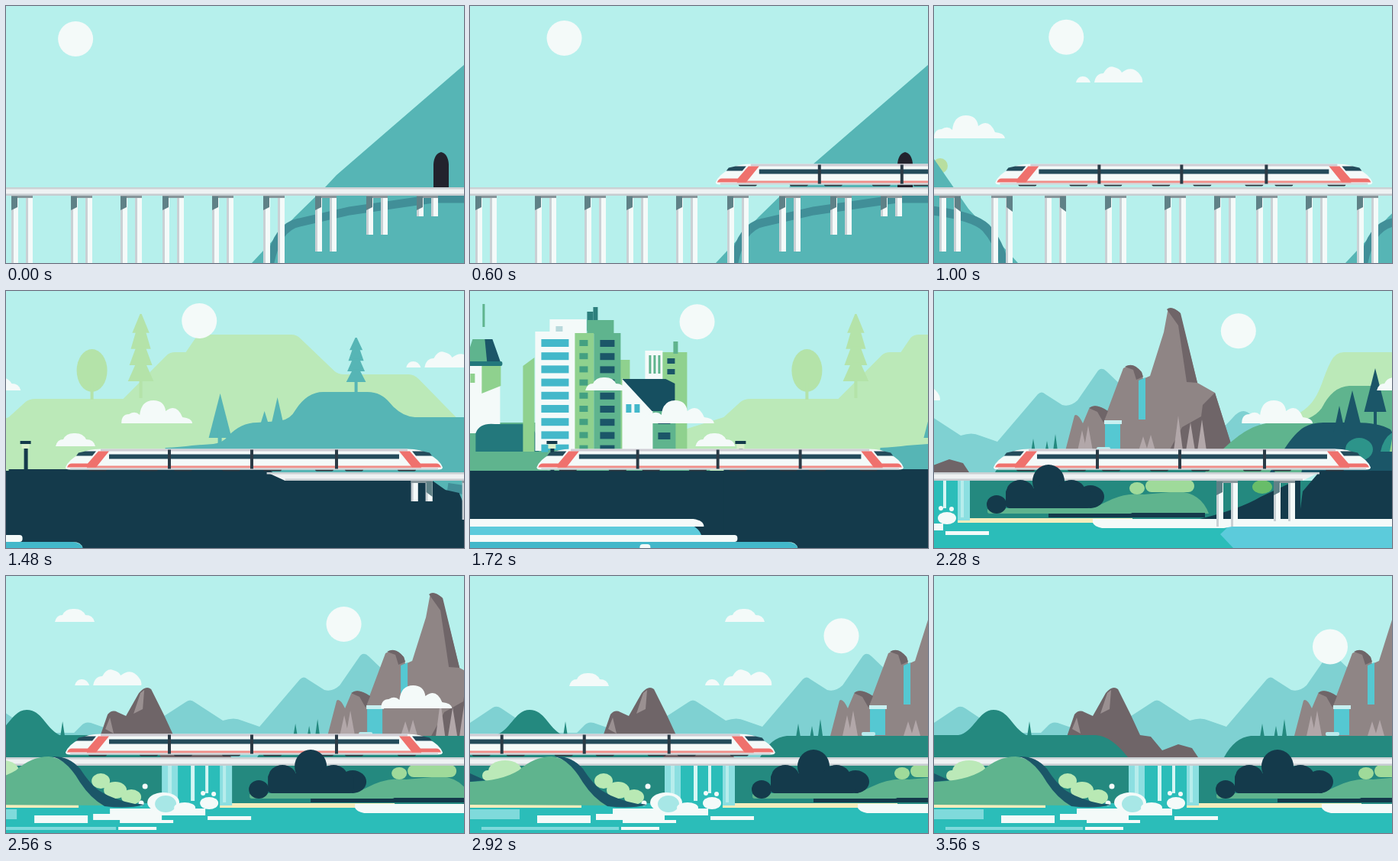
These frames come from a looping animation (600x336 px, 3600 ms). An HTML page:

```html
<!DOCTYPE html>
<html lang="en">
<head>
<meta charset="utf-8">
<title>Train journey</title>
<style>
html, body { margin: 0; width: 100%; height: 100%; overflow: hidden; background: #b6f0ec; }
svg { display: block; width: 100vw; height: 100vh; }
</style>
</head>
<body>
<svg id="stage" viewBox="0 0 600 336" preserveAspectRatio="none"></svg>
<script>
const sky = '#b6f0ec', white = '#f4faf9', navy = '#143a4b', teal = '#56b5b5', pale = '#bbe9b8',
  green = '#5fb48e', deep = '#24897f', ink = '#1b5668', rock = '#8f8585', shade = '#6f6568',
  far = '#7fd1d2', sea = '#2bbdb9', blue = '#5ccbdb', cyan = '#43b8ca', red = '#ef716d',
  sand = '#f5edbc', leaf = '#8fd18e', bush = '#2d948a';

const path = (fill, d) => `<path fill="${fill}" d="${d}"/>`;
const rect = (fill, x, y, w, h, r = 0) => `<rect fill="${fill}" x="${x}" y="${y}" width="${w}" height="${h}" rx="${r}"/>`;
const oval = (fill, x, y, rx, ry = rx) => `<ellipse fill="${fill}" cx="${x}" cy="${y}" rx="${rx}" ry="${ry}"/>`;
const at = (x, ...parts) => `<g transform="translate(${x})">${parts.join('')}</g>`;
const many = (n, f) => Array.from({ length: n }, (_, i) => f(i)).join('');
const cone = (fill, x, y, w, h) => path(fill, `M${x} ${y}l${w / 2} ${h}h${-w}z`);

// Pine made of stacked tiers on a thin trunk
const pine = (fill, x, y, w, h, trunk) => many(4, i => {
  const half = w * (0.33 + i * 0.055), tip = i ? w * 0.17 : 1, top = y + h * i * 0.24;
  return path(fill, `M${x - tip} ${top}H${x + tip}L${x + half} ${top + h * 0.28}H${x - half}z`);
}) + rect(fill, x - 2, y + h - 2, 4, trunk);

const lamp = x => rect(navy, x - 7, 196, 14, 4) + rect('#d9efcb', x - 5, 200, 10, 6) + rect(navy, x - 2, 206, 5, 30);

// Twin columns; flip puts the cap shadow on the right one
function pier(x, end = 336, flip = false) {
  const column = cx => rect('#c9d0d4', cx, 248, 9, end - 248) + rect(white, cx + 3, 248, 6, end - 248);
  return column(x - 3) + column(x + 16) + rect('#87969b', x - 3, 247, 28, 4) +
    path('#5f8187', flip ? `M${x + 25} 249v20l-8-6v-14z` : `M${x - 3} 249v18l8-4v-14z`);
}

// Deck with top edge x0..x1 and bottom edge x2..x3
const bridge = (x0, x1, x2, x3) => path('#eff2f3', `M${x0} 237H${x1}L${x3} 248H${x2}z`) +
  rect('#cbd1d4', x0, 237, x1 - x0, 2.5) + rect('#c6ccd0', x2, 245.5, x3 - x2, 2.5);

const farRange = path(far, 'M0 192L30 172Q35 169 41 173L62 187L85 205H140L150 195Q155 190 162 192L185 200L238 196L286 165Q292 160 298 165L335 189Q350 184 360 189L383 197L436 135Q441 130 446 135L468 149Q478 152 488 143L515 104Q520 99 526 105L548 126L640 220L692 165Q705 150 716 163L760 205V237H0z');

const lake = [
  farRange,
  path(shade, 'M174 210L184 181Q190 174 197 178L208 183L225 153Q234 142 241 148L258 182L270 208L284 210L299 228L320 220L338 225L346 237H230z'),
  path('#9a9091', 'M218 180L227 153L232 149L230 174zM181 200L187 185L192 206z'),
  path(deep, 'M0 208H32C52 205 58 175 78 175S102 198 121 208H212Q232 209 254 237H0z'),
  path(deep, 'M380 237Q394 211 415 209H720L800 237z'),
  cone(deep, 125, 190, 6, 20), cone(deep, 430, 193, 6, 18), cone(deep, 459, 187, 6, 22), cone(deep, 448, 196, 5, 14),
];

const peak = [
  path(rock, 'M172 209L184 163Q188 159 195 173L203 154Q210 145 227 157L248 101Q260 93 272 106L274 115L283 111L301 54L306 27Q309 18 322 28L345 120L368 133L392 209z'),
  path(shade, 'M250 99Q261 92 272 106L274 112L265 116L261 103zM305 24Q311 18 323 29L345 120L331 119L320 45zM368 133L392 209H308L325 178L350 164L352 149zM203 153Q212 146 228 157L222 172L214 158z'),
  path('#55c8d2', 'M268 117L277 113V168H268z'), rect('#55c8d2', 224, 171, 20, 37), rect('#c8eff0', 223, 169, 23, 5),
  rect('#b8eaec', 213, 204, 18, 5, 2),
  ...[[194, 182], [202, 176], [274, 190], [284, 188], [320, 163], [336, 172], [351, 168]].map(([x, y]) => cone('#b2a7a9', x, y, 12, 209 - y)),
];

const town = [
  path(pale, 'M0 205V172Q35 168 54 147C68 130 70 110 80 92Q86 80 97 80H238Q248 80 256 86L322 148L340 205z'),
  path(green, 'M-65 210C-45 192 -30 178 -5 173H20Q55 171 68 153Q82 125 104 124H160Q174 125 180 140L200 172H430V237H-85z'),
  path(ink, 'M0 237C12 218 28 188 45 178Q57 171 75 172H112Q142 172 158 181L190 237z'),
  cone(ink, 138, 101, 29, 57), rect(ink, 136, 155, 4, 20), cone(ink, 108, 130, 24, 48), cone(ink, 91, 150, 15, 35),
  pine(bush, 209, 47, 35, 84, 45),
  path(bush, 'M145 210Q150 184 174 180Q186 162 210 164Q256 158 266 184L274 210z'),
  cone(bush, 187, 152, 14, 30), cone(bush, 240, 133, 16, 40), cone(bush, 172, 162, 12, 30),
  oval(bush, 117, 207, 18, 15), oval(green, 24, 233, 18, 15),
  cone(leaf, 164, 172, 14, 38), cone(ink, 202, 175, 16, 35),
  oval(ink, 295, 161, 17, 15), path(ink, 'M273 210V182Q276 168 295 168Q313 168 314 210z'),
  rect(white, 321, 96, 46, 90), path(leaf, 'M343 98h25v26l-25 10z'), rect(leaf, 328, 108, 6, 12),
  rect(green, 344, 17, 3, 30), path(green, 'M331 63H354L367 94H321z'), path(ink, 'M347 63H357L368 94H350z'),
  rect('#23787c', 319, 92, 51, 6, 2),
  path('#23787c', 'M335 210V186Q340 172 360 174H398Q418 178 418 210z'),
  path(leaf, 'M397 210V98L412 87V210z'), rect(leaf, 520, 90, 17, 118),
  rect(white, 432, 37, 48, 20), rect('#b9d9dc', 440, 46, 9, 7),
  rect('#2d7f7d', 481, 27, 8, 25), rect('#2d7f7d', 489, 21, 6, 22), rect(green, 481, 38, 35, 18),
  rect(white, 413, 53, 53, 156), rect(leaf, 465, 55, 25, 154), rect(green, 490, 55, 35, 154),
  many(9, i => rect(cyan, 421, 63 + i * 17.2, 36, 10) + rect('#43a081', 471, 64 + i * 17.2, 11, 8) + rect(ink, 498, 64 + i * 17.2, 19, 9)),
  rect(white, 557, 78, 23, 60), rect(leaf, 580, 80, 32, 157), rect(green, 594, 66, 6, 16),
  many(3, i => rect(green, 562 + i * 6, 84, 3, 24)), many(2, i => rect(ink, 586, 88 + i * 14, 10, 7)),
  rect(green, 563, 150, 34, 60), path(white, 'M527 209V114L567 157V209z'), path('#164f60', 'M527 115H584L596 121V157H566z'),
  many(2, i => rect(cyan, 532 + i * 11, 148, 7, 11) + rect(ink, 574, 165 + i * 20, 16, 9)),
  rect(green, 430, 208, 212, 30), lamp(223), lamp(435),
];

const hills = [
  path(pale, 'M-80 190L0 165L22 145Q27 141 35 141H150L207 84Q211 80 218 80H232L245 61Q249 57 256 57H370Q377 57 382 62L427 105Q432 109 439 109H524Q531 109 537 115L586 165L620 237H-80z'),
  oval('#b4e3a9', 109, 104, 20, 28), rect('#b4e3a9', 107, 120, 4, 22), pine('#b4e3a9', 173, 30, 34, 88, 24),
  oval('#b8dea0', 662, 209, 10),
  path(teal, 'M205 237V205Q225 204 240 202L268 200Q281 198 287 190Q304 172 325 172L355 170Q369 168 376 155Q391 132 412 132H470Q488 132 500 147Q514 164 532 165H620L654 200L699 265L764 336H560L210 237z'),
  cone(teal, 277, 134, 30, 58), rect(teal, 274, 180, 5, 23), cone(teal, 335, 157, 10, 16), cone(teal, 352, 139, 15, 33),
  pine(teal, 455, 61, 26, 58, 16), lamp(22),
  '<path d="M575 257L640 266Q705 273 722 290Q740 310 746 340" fill="none" stroke="#418f98" stroke-width="12"/>',
];

const tunnel = [
  path(teal, 'M322 336L378 276L418 237L433 221L600 77V336z'),
  path('#22232d', 'M560 238V207Q561 193 570 191Q579 193 580 207V238z'),
  '<path d="M345 340Q354 289 384 283L450 268L560 252H600" fill="none" stroke="#418f98" stroke-width="11"/>',
];

const ground = [
  // Shore and waterfall
  rect(deep, 0, 248, 805, 52), path(navy, 'M640 300Q700 286 728 269L780 245V300z'),
  rect(sea, 0, 303, 900, 33), rect(sand, 0, 297, 560, 6),
  rect('#8cdfe1', 255, 248, 92, 52), rect(sea, 276, 248, 55, 56), rect('#b7edec', 263, 248, 5, 48),
  rect('#d5f6f4', 293, 248, 5, 46), rect('#d5f6f4', 312, 248, 4, 36), rect('#b7edec', 335, 248, 4, 48), rect(sea, 146, 297, 184, 10),
  rect('#7fdadb', 0, 305, 65, 13), rect('#7fdadb', 15, 328, 180, 4),
  rect(white, 88, 313, 70, 10), rect(white, 165, 311, 90, 8), rect(white, 187, 304, 125, 9), rect(white, 200, 319, 70, 4),
  rect(white, 198, 328, 50, 4), rect(white, 315, 314, 57, 5),
  oval(white, 257, 296, 21, 13), oval('#a7e7e6', 260, 298, 14, 11), oval(white, 285, 303, 14, 7), oval(white, 317, 297, 12, 8),
  oval(white, 323, 285, 3), oval(white, 309, 284, 3), oval(white, 233, 275, 3.5), oval(white, 228, 297, 3.5),
  path(green, 'M480 291Q510 284 525 276Q550 263 575 266L620 262Q650 264 660 291z'),
  oval('#9fda9a', 566, 258, 10, 8), rect('#9fda9a', 577, 247, 64, 16, 8), oval('#68bd69', 730, 256, 13, 9),
  rect(navy, 450, 290, 205, 6), rect(green, 370, 284, 190, 7, 3),
  // Town embankment and canal
  path(navy, 'M778 300L783 262L806 235H1440V336H780z'),
  path(blue, 'M675 318L690 304H1350Q1372 308 1372 328H1400V336H692z'),
  path(white, 'M508 298H1360Q1374 300 1374 308H690L680 310H520Q510 308 508 303z'),
  path(cyan, 'M935 328H1484Q1496 330 1497 336H930z'),
  path(navy, 'M1400 233H1740L1762 248H1955L1972 260L1990 264L2005 300L2025 336H1497Q1495 328 1484 328H1400z'),
  rect(white, 1063, 319, 355, 9, 4), rect(white, 1290, 331, 14, 9, 4),
  pier(673, 308), pier(748, 301), bridge(-5, 805, -5, 783),
  pier(1930, 275, true), pier(1997, 299, true), pier(2064, 321, true), pier(2132, 336, true), pier(2202, 336, true),
  ...[10, 88, 153, 208, 273, 340].map(x => pier(2271 + x)), pier(2679, 321), pier(2746, 299), pier(2812, 275),
  bridge(1738, 2880, 1762, 2880),
];

const front = [
  oval(pale, 46, 255, 22, 14), rect(pale, 16, 254, 63, 14, 7),
  path(green, 'M0 299V269Q42 268 64 254Q84 236 107 236Q128 238 146 263Q163 292 190 300z'),
  path(ink, 'M112 236Q133 235 148 252Q167 282 192 293L232 299Q210 305 180 301Q162 291 148 270Q132 242 112 236zM0 258L20 267L0 269z'),
  oval('#b9e9b4', 175, 268, 12, 10), oval('#b9e9b4', 194, 280, 15, 11), oval('#b9e9b4', 215, 289, 13, 10),
  path(ink, 'M152 262Q175 292 232 300H182Q164 290 152 270z'),
  oval(navy, 450, 249, 21, 22), oval(navy, 413, 262, 18, 15), oval(navy, 480, 262, 18, 15), oval(navy, 505, 269, 18, 15),
  oval(navy, 382, 279, 13, 12), rect(navy, 394, 258, 112, 26, 5),
];

// Drawn with its nose at x = 0
const nose = path(red, 'M43 3H57L40 24H2Q4 19 8 19H29z') + path('#234b5b', 'M17 5L26 3H40L35 9H14z');
const train = [
  ...[30, 97, 142, 205, 259, 327, 366, 435].map(x => rect('#2c353d', x, 24, 24, 5, 2)),
  path(white, 'M0 24Q4 14 18 7Q28 0 46 0H448Q466 0 476 7Q490 14 494 24Q494 27 489 27H5Q0 27 0 24z'),
  rect('#d0ced5', 46, 0, 402, 3), rect('#234b5b', 57, 7, 380, 6), rect('#f08d88', 28, 22, 438, 3),
  rect('#cdd3d7', 6, 25, 482, 2), nose, `<g transform="translate(494) scale(-1 1)">${nose}</g>`,
  ...[135, 243, 354].map(x => rect('#2b3b46', x - 1, 1, 4, 25)),
];

const shapes = {
  big: 'M0 0Q0-12 10-12Q18-17 24-11Q26-30 42-30Q56-30 58-16Q72-27 80-8Q92-7 93 0z',
  pair: 'M0 0Q2-8 9-8T19 0zM24 0Q26-12 36-12Q42-23 50-20Q58-18 60-13Q74-24 84-10Q88-5 87 0z',
  small: 'M0 0Q2-9 10-9Q14-18 26-17Q36-17 40-9Q50-9 52 0z',
};
// shape, baseline, x at the given time, speed in px per ms
const clouds = [
  ['big', 173, 0, 1000, 0.315], ['pair', 100, 186, 1000, 0.705], ['small', 203, 65, 1480, 0.96],
  ['small', 130, 335, 1960, 0.766], ['pair', 143, 308, 2920, 0.605], ['small', 60, 334, 2920, 0.75], ['small', 144, 130, 2920, 0.78],
];

const stage = document.getElementById('stage');
stage.innerHTML = rect(sky, 0, 0, 600, 336) +
  `<g class="world">${lake.join('')}${at(300, ...peak)}${at(1400, ...hills)}${at(740, ...town)}${at(2271, ...tunnel)}${ground.join('')}</g>` +
  `<g id="sun">${oval(white, 0, 0, 23)}</g><g id="train">${train.join('')}</g>` +
  clouds.map(c => `<g class="cloud">${path(white, shapes[c[0]])}</g>`).join('') +
  `<g class="world">${front.join('')}</g>`;

const worlds = stage.querySelectorAll('.world'), puffs = stage.querySelectorAll('.cloud');
const sun = document.getElementById('sun'), engine = document.getElementById('train');
const move = (el, x, y = 0, sx = 1) => el.setAttribute('transform', `translate(${x.toFixed(2)} ${y.toFixed(2)}) scale(${sx.toFixed(4)} 1)`);
const clamp = p => Math.min(1, Math.max(0, p));
const ease = p => (1 - Math.cos(Math.PI * clamp(p))) / 2;

// Soft start, steady cruise, soft stop
function scroll(t) {
  if (t < 600) return 0;
  if (t < 1000) return 217 * ((t - 600) / 400) ** 2.53;
  if (t < 2280) return 217 + (t - 1000) * 1.37;
  return 2271 - 300 * Math.max(0, 1 - (t - 2280) / 560) ** 2.56;
}

function draw(t) {
  const x = 91 + 428 * ease((t + 40) / 3600);
  const y = 39 + (x > 230 ? 53 * ((x - 230) / 288) ** 2.6 : 4 * (230 - x) / 139);
  worlds.forEach(w => move(w, scroll(t) - 2271));
  move(sun, x, y);
  // The train contracts slightly at full speed, towards its rear
  const squeeze = 0.042 * Math.sin(Math.PI * clamp((t - 1480) / 800)) ** 2;
  const left = 78 + 600 * (1 - ease((t - 40) / 1000)) - 600 * ease((t - 2560) / 1000);
  move(engine, left + 342 * squeeze, 206.5, 1 - squeeze);
  clouds.forEach(([, base, x0, t0, v], i) => move(puffs[i], x0 + (t - t0) * v, base));
}

const start = performance.now();
function tick() {
  const t = (performance.now() - start) % 3600;
  draw(Math.floor(t / 40) * 40);
  requestAnimationFrame(tick);
}
tick();
</script>
</body>
</html>
```
